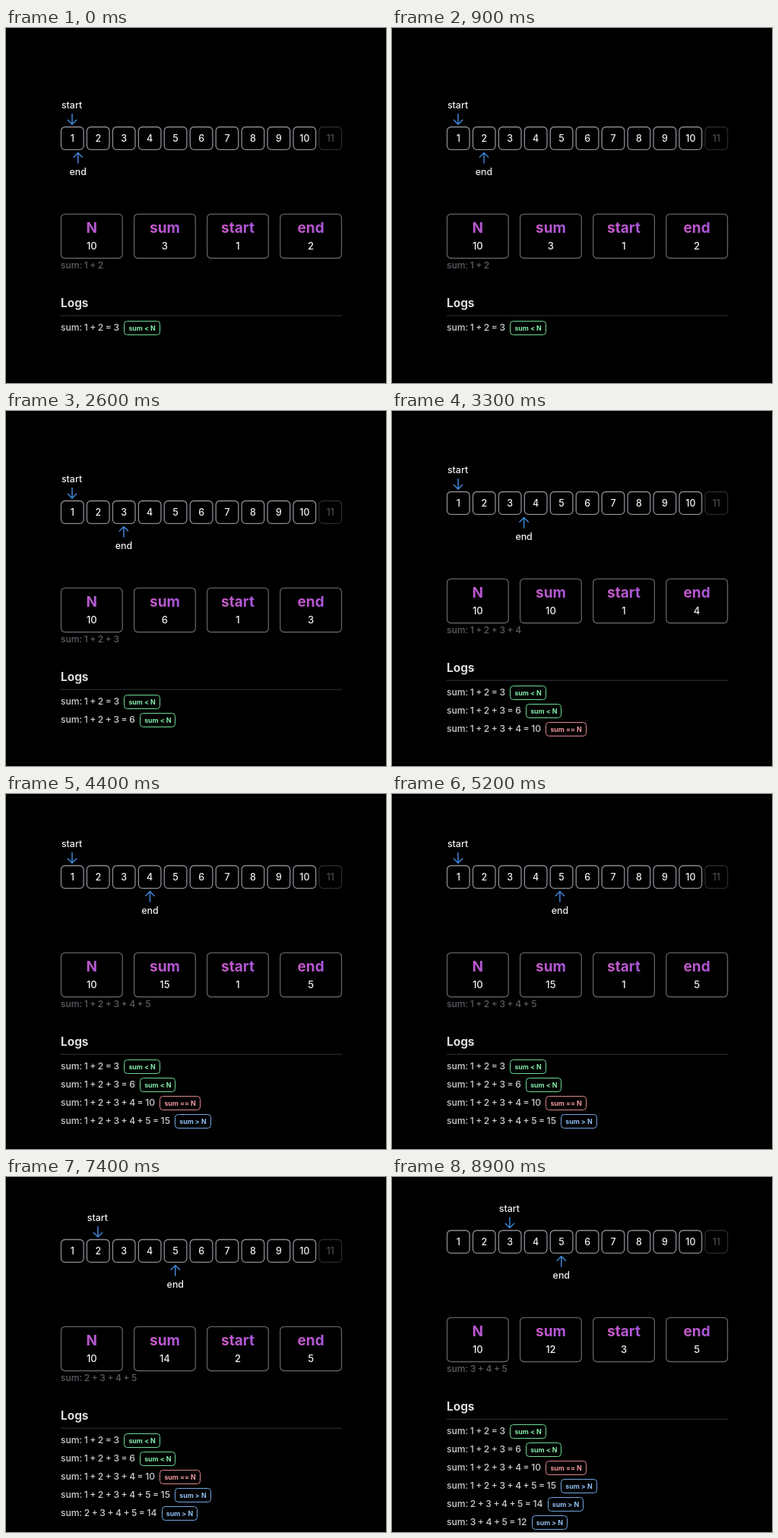
An HTML page for the animation above (9 s loop, 500 by 468 pixels).

```html
<!DOCTYPE html>
<html lang="en">
<head>
<meta charset="utf-8">
<title>Sliding window sum</title>
<style>
@property --i { syntax: "<integer>"; inherits: true; initial-value: 0; }

html, body { margin: 0; width: 100%; height: 100%; overflow: hidden; background: #000; }
body { font: 450 12.1px/18px Inter, "Noto Sans", sans-serif; color: #f1f1f3; }
#stage { position: relative; width: 500px; height: 468px; overflow: clip; contain: paint; }

/* --i is the current step; layout, values and logs all follow it */
#scene {
  position: absolute; inset: 0;
  transform: translateY(calc(var(--i) * -12px));
  animation: step 9s step-end infinite;
}
@keyframes step {
  0% { --i: 0; }
  15.23% { --i: 1; }
  32.42% { --i: 2; }
  48.78% { --i: 3; }
  65.73% { --i: 4; }
  82.33%, 100% { --i: 5; }
}

svg { position: absolute; left: 0; top: 0; overflow: visible; }
svg text { fill: #f1f1f3; font-size: 12.4px; font-weight: 500; text-anchor: middle; }
svg rect { fill: none; stroke: #8b8b95; stroke-width: 1.3; }
svg .box { stroke: #606068; }
.rule { stroke: #33333d; }
.arrow { fill: none; stroke: #3f86d8; stroke-width: 1.5; stroke-linecap: round; stroke-linejoin: round; }

#end { animation: end 9s ease-out infinite; }
#start { animation: start 9s ease-out infinite; }
@keyframes end {
  0% { transform: translateX(7.7px); animation-timing-function: cubic-bezier(.232, .381, .66, 1); }
  9.52%, 15.23% { transform: translateX(33.95px); }
  26.34%, 32.42% { transform: translateX(67.9px); }
  43.53%, 48.78% { transform: translateX(101.85px); }
  59.89%, 100% { transform: translateX(135.8px); }
}
@keyframes start {
  0%, 65.73% { transform: translateX(0); }
  76.84%, 82.33% { transform: translateX(33.95px); }
  93.44%, 100% { transform: translateX(67.9px); }
}

.var { position: absolute; top: 253px; width: 81px; text-align: center; }
.name {
  font-size: 19px; line-height: 22px; font-weight: 700; color: transparent;
  background: linear-gradient(90deg, #d45ab9, #9a55e6);
  -webkit-background-clip: text; background-clip: text;
}
.strip { height: 18px; overflow: hidden; white-space: nowrap; }
.strip > div { transform: translateY(calc(var(--i) * -18px)); }
.strip span { display: block; }
.var .strip { margin-top: 3px; font-size: 13px; font-weight: 500; }

#sum, #logs { word-spacing: -.7px; }
#sum { position: absolute; left: 72px; top: 304px; color: #5d5d66; }
h2 { position: absolute; left: 72px; top: 353px; margin: 0; font-size: 15.4px; line-height: 20px; font-weight: 700; color: #dcdce0; }
#logs {
  position: absolute; left: 72px; top: 383px; width: 370px;
  height: calc((var(--i) + 1) * 24px); overflow: hidden; color: #cfcfd5;
}
.log { display: flex; align-items: center; height: 24px; white-space: nowrap; }
.tag {
  box-sizing: border-box; height: 19px; margin-left: 6.4px; padding: 0 5px;
  border: 1px solid; border-radius: 4.5px;
  font-size: 8.8px; line-height: 17px; font-weight: 650; word-spacing: 0;
}
.lt { color: #86efac; border-color: #6cdb97; }
.eq { color: #f19a9f; border-color: #dd858b; }
.gt { color: #93c0f5; border-color: #74a6e2; }
</style>
</head>
<body>
<div id="stage">
  <div id="scene">
    <svg width="500" height="468">
      <g id="cells"></g>
      <g id="start">
        <text x="86.5" y="106">start</text>
        <path class="arrow" d="M87 113.5V127M81.3 121.2L87 127L92.7 121.2"/>
      </g>
      <g id="end">
        <text x="87" y="193.6">end</text>
        <path class="arrow" d="M87 178V164.5M81.3 170.3L87 164.5L92.7 170.3"/>
      </g>
      <g id="boxes"></g>
      <path class="rule" d="M72 379.2H442"/>
    </svg>
    <div id="vars"></div>
    <div id="sum" class="strip"></div>
    <h2>Logs</h2>
    <div id="logs"></div>
  </div>
</div>
<script>
const N = 10;
const ranges = [[1, 2], [1, 3], [1, 4], [1, 5], [2, 5], [3, 5]];
const byId = id => document.getElementById(id);

const steps = ranges.map(([start, end]) => {
  const nums = [];
  for (let n = start; n <= end; n++) nums.push(n);
  return { N, start, end, sum: nums.reduce((a, b) => a + b), expr: "sum: " + nums.join(" + ") };
});

const strip = key => `<div>${steps.map(s => `<span>${s[key]}</span>`).join("")}</div>`;

function tag(sum) {
  const [cls, op] = sum < N ? ["lt", "&lt;"] : sum > N ? ["gt", "&gt;"] : ["eq", "=="];
  return `<span class="tag ${cls}">sum ${op} N</span>`;
}

byId("cells").innerHTML = Array.from({ length: N + 1 }, (_, i) => {
  const x = 72.5 + i * 33.95;
  return `<g opacity="${i < N ? 1 : .3}">
    <rect x="${x}" y="130.5" width="29.6" height="29.8" rx="5"/>
    <text x="${x + 14.8}" y="150.3">${i + 1}</text></g>`;
}).join("");

const names = ["N", "sum", "start", "end"];
byId("boxes").innerHTML = names.map((_, i) =>
  `<rect class="box" x="${72.5 + i * 96.1}" y="245.3" width="80.7" height="58.2" rx="5"/>`).join("");
byId("vars").innerHTML = names.map((name, i) =>
  `<div class="var" style="left:${72.3 + i * 96.1}px">
    <div class="name">${name}</div><div class="strip">${strip(name)}</div></div>`).join("");

byId("sum").innerHTML = strip("expr");
byId("logs").innerHTML = steps.map(s =>
  `<div class="log">${s.expr} = ${s.sum}${tag(s.sum)}</div>`).join("");
</script>
</body>
</html>
```
